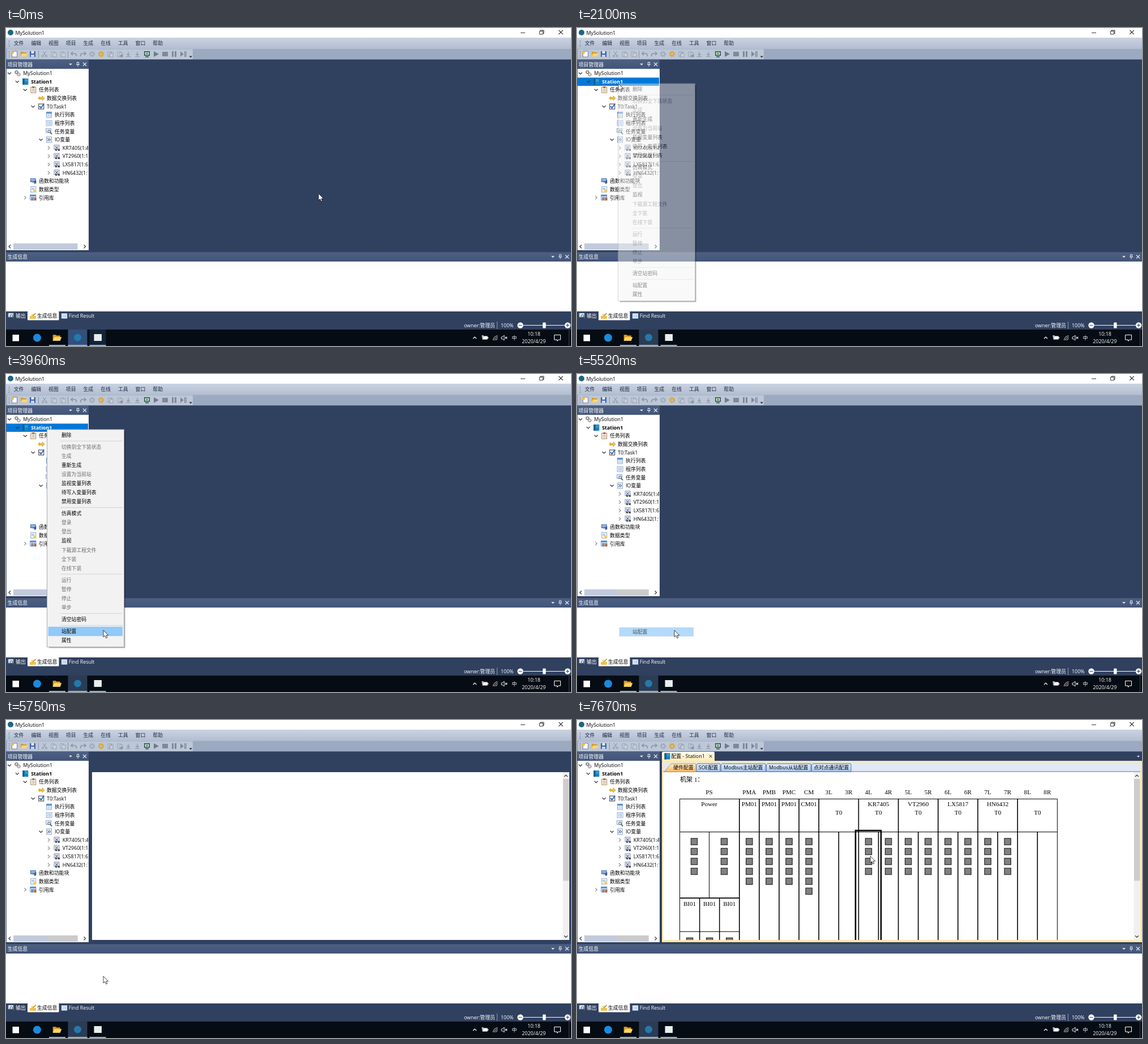
An HTML page for the animation above (8 s loop, 998x561 px).

```html
<!DOCTYPE html>
<html lang="zh-CN">
<head>
<meta charset="utf-8">
<title>MySolution1</title>
<style>
html, body { margin: 0; width: 100%; height: 100%; overflow: hidden; background: #30405f; }
svg { display: block; }
#stage { width: 100vw; height: 100vh; }
text { font: 8.9px 'Open Sans', 'Noto Sans CJK SC', 'Noto Sans CJK', sans-serif; white-space: pre; }
.serif text { font: 11.1px 'Liberation Serif', 'Noto Sans CJK SC', 'Noto Sans CJK', serif; }
.menu text { font-size: 8.8px; }
.bold { font-weight: 700; }
.mid { text-anchor: middle; }
.end { text-anchor: end; }
</style>
</head>
<body>
<svg id="stage" viewBox="0 0 998 561" preserveAspectRatio="none"></svg>
<script>
const LOOP = 8000;
const rect = (x, y, w, h, fill, extra = '') =>
  `<rect x="${x}" y="${y}" width="${w}" height="${h}" fill="${fill}" ${extra}/>`;
const text = (x, y, s, fill = '#000', cls = '', extra = '') =>
  `<text x="${x}" y="${y}" fill="${fill}" class="${cls}" ${extra}>${s}</text>`;
const line = (d, color, width = 1) =>
  `<path d="${d}" fill="none" stroke="${color}" stroke-width="${width}"/>`;
const shape = (d, fill, extra = '') => `<path d="${d}" fill="${fill}" ${extra}/>`;
const disc = (x, y, r, fill, extra = '') => `<circle cx="${x}" cy="${y}" r="${r}" fill="${fill}" ${extra}/>`;
const at = (x, y, body) => `<g transform="translate(${x} ${y})">${body}</g>`;
const group = (id, body, cls = '') => `<g id="${id}" class="${cls}">${body}</g>`;
const view = (x, y, w, h, body) =>
  `<svg x="${x}" y="${y}" width="${w}" height="${h}" viewBox="${x} ${y} ${w} ${h}">${body}</svg>`;
const gradient = (id, from, to) =>
  `<linearGradient id="${id}" x2="0" y2="1"><stop stop-color="${from}"/><stop offset="1" stop-color="${to}"/></linearGradient>`;
const cross = (x, y, r, color) =>
  line(`M${x - r} ${y - r}l${2 * r} ${2 * r}m0 ${-2 * r}l${-2 * r} ${2 * r}`, color, 1.1);
const chevron = (x, y, dir, color = '#333') =>
  at(x, y, `<g transform="rotate(${dir})">${line('M-3 -1.5L0 1.5L3 -1.5', color, 1.2)}</g>`);

// Icons are drawn around 0,0 in an 11 px box.
const page = (fill = '#fff', edge = '#7e93b3') => rect(-4.5, -5, 9, 10, fill, `stroke="${edge}" stroke-width=".8"`);
const gear = color => disc(0, 0, 3, 'none', `stroke="${color}" stroke-width="2"`) +
  disc(0, 0, 4.7, 'none', `stroke="${color}" stroke-width="1.4" stroke-dasharray="1.8 1.9"`);
const grid = page('#fff', '#7096c8') + rect(-5, -5, 10, 3, '#5b8fd0') +
  line('M-4 0H4M-4 2.5H4M-1.5 -2V5M1.8 -2V5', '#9bb8dc', .7);
const folder = shape('M-6 -4H-2L-1 -3H4V4H-6Z', '#d99b26') + shape('M-4 -1H6L4 4H-6Z', '#ffd766');
const icons = {
  solution: at(-2, -2, `<g transform="scale(.7)">${gear('#777')}</g>`) +
    at(2, 2, `<g transform="scale(.7)">${gear('#999')}</g>`),
  station: rect(-5, -5.5, 10, 11, '#1685bf') + rect(-5, -5.5, 3, 11, '#175a87') + line('M-1 -3H4M-1 -1H4', '#67bde5', .8),
  tasks: page('#fff7e6', '#9a6a35') + rect(-2, -6, 4, 2.5, '#8a5a2c') + line('M-2.5 -1.5H3M-2.5 .5H3M-2.5 2.5H3', '#999', .8),
  exchange: shape('M-6 0L-2 -4V-1.5H0V2H-2V4Z', '#e8b02c') + shape('M6 0L2 -4V-1.5H.5V2H2V4Z', '#f2cb55', 'stroke="#ba8416" stroke-width=".7"'),
  check: rect(-4.5, -4.5, 9, 9, '#fff', 'stroke="#555" stroke-width="1.2"') + line('M-3 -.5L-.5 2.5L5 -5', '#2468c8', 2),
  grid,
  program: rect(-5, -4.5, 10, 9, '#edf4fd', 'stroke="#7e9dc7" stroke-width=".8"') +
    line('M-3 -2H-1M0 -2H3M-3 0H-1M0 0H3M-3 2H-1M0 2H3', '#7aa0d4', .9),
  variable: rect(-5.5, -5, 9, 7, '#e4edf8', 'stroke="#7795bd" stroke-width=".8"') + disc(0, 0, 2.3, '#d4e8fb', 'stroke="#555"') +
    line('M2 2L5 5', '#555', 1.6),
  io: page('#eef2fb') + line('M-3 -2.5L-.5 0L-3 2.5M0 -2.5L2.5 0L0 2.5', '#4a68a8', 1.1),
  module: rect(-5, -5, 9, 8, '#e6e9f2', 'stroke="#76809a" stroke-width=".8"') +
    line('M-3 -3L2 2M2 -3L-3 2', '#5570a8', 1.1) + rect(-3, 2, 3, 3, '#444') + rect(1.5, 2, 3.5, 3, '#444'),
  block: rect(-5.5, -5, 10, 7, '#5c86c4') + line('M-4 -3H3M-4 -1H3', '#d7e5f7', .9) + shape('M5 -2V4L1 5L2 2L-2 3Z', '#34558c'),
  type: page('#f4f8ff') + line('M-3 -2H2M-3 0H1', '#6f9ad0', .9) + rect(0, 0, 5, 5, '#f0cf60'),
  library: rect(-5.5, -5, 10, 9, '#dce8f7', 'stroke="#4778b3" stroke-width=".8"') + rect(-5.5, -5, 10, 2.5, '#4f8ac9') +
    rect(-3.5, -1, 2.5, 6, '#4278b8') + rect(0, -1, 2.5, 6, '#d96b3b') + rect(3, 0, 2, 5, '#8a5030'),
  build: rect(-5.5, 0, 11, 5, '#efc14f') + rect(-3, -4, 4, 4, '#f7dc85') + line('M0 0L5 -5', '#b5822a', 1.6)
};
const icon = (name, x, y) => at(x, y, icons[name]);

const MODULES = ['KR7405', 'VT2960', 'LX5817', 'HN6432'];

function titleAndBars() {
  const names = ['文件', '编辑', '视图', '项目', '生成', '在线', '工具', '窗口', '帮助'];
  const gray = '#8a94a6';
  const blank = at(0, 0, rect(-4, -4, 6, 8, '#c9d0dc', `stroke="${gray}" stroke-width=".8"`) +
    rect(-1, -2, 6, 7, '#c9d0dc', `stroke="${gray}" stroke-width=".8"`));
  const down = line('M0 -4V2M-2.5 0L0 2.5L2.5 0M-4 4.5H4', gray, 1.2);
  const tools = [
    [15, page('#fff', '#667') + disc(-3.5, -3, 2.5, '#f2bd36')],
    [32, folder],
    [47, rect(-5, -5, 10, 10, '#3e62a8') + rect(-2.5, -5, 5, 4, '#e8eefa') + rect(-3, 1, 6, 4, '#c4d3ee')],
    [68, line('M-3 -5L2 2M3 -5L-2 2', gray) + disc(-3, 3.5, 1.6, 'none', `stroke="${gray}"`) + disc(3, 3.5, 1.6, 'none', `stroke="${gray}"`)],
    [84, blank], [100, blank],
    [120, line('M-2 -4L-5 -1L-2 2M-5 -1H2Q5 0 4 4', gray, 1.7)],
    [136, line('M2 -4L5 -1L2 2M5 -1H-2Q-5 0 -4 4', gray, 1.7)],
    [152, gear('#a2abba')], [168, gear('#e0a526')],
    [184, blank + line('M-3 4L4 -4', gray)], [201, blank + disc(3, 3, 2.5, gray)],
    [216, down], [232, down],
    [249, rect(-5, -5, 10, 8, '#30465a') + rect(-3.5, -3.5, 7, 5, '#cfeccb') + disc(0, -1, 1.8, '#3da34a') + rect(-3, 4, 6, 1.5, '#30465a')],
    [265, shape('M-4 -5L5 0L-4 5Z', '#6f7b8e')],
    [281, rect(-5, -4, 10, 8, '#7f899a')],
    [297, rect(-4, -5, 3, 10, '#7f899a') + rect(1, -5, 3, 10, '#7f899a')],
    [313, shape('M-5 -5L1 0L-5 5Z', '#7f899a') + rect(2, -5, 1.6, 10, '#7f899a') + rect(4.5, -5, 1.3, 10, '#7f899a')]
  ];
  return rect(0, 0, 998, 17, '#fff') + disc(8, 8, 5, '#1c6685') + text(16.5, 11.5, 'MySolution1') +
    line('M909 8.5H917M942.5 5.5H948.5V11H942.5ZM944 5.5V4H950V9.5H948.5', '#222', .9) + cross(980, 7.5, 3.7, '#222') +
    rect(0, 17, 998, 20, 'url(#bar)') + rect(0, 37, 998, 18.5, '#9caac1') +
    rect(2, 37.5, 328, 17.5, '#bcc7d8', 'rx="1.5"') +
    line('M5.5 22V33M5.5 41V52', '#6d7b92', '1.4" stroke-dasharray="1.4 1.8') +
    names.map((s, i) => text(13.7 + 30.7 * i, 30.2, s, '#1b293e')).join('') +
    tools.map(([x, body]) => at(x, 46, body)).join('') +
    line('M57.5 40V53M109.5 40V53', '#8592a8', .9) + shape('M323.5 49.5H329L326.2 52.5Z', '#333');
}

function header(y, w, title) {
  return rect(0, y, w, 16.5, 'url(#head)') + text(2.7, y + 11.7, title, '#fff') +
    shape(`M${w - 35} ${y + 6.7}h6l-3 3z`, '#e6ebf4') +
    line(`M${w - 21} ${y + 4.5}h4M${w - 20.5} ${y + 4.5}v4M${w - 17.5} ${y + 4.5}v4M${w - 22} ${y + 8.5}h6m-3 0v3.5`, '#e6ebf4') +
    cross(w - 7, y + 8, 3, '#e6ebf4');
}

function tree() {
  // level, label, icon, chevron rotation
  const rows = [
    [0, 'MySolution1', 'solution', 0], [1, 'Station1', 'station', 0], [2, '任务列表', 'tasks', 0],
    [3, '数据交换列表', 'exchange'], [3, 'T0:Task1', 'check', 0], [4, '执行列表', 'grid'],
    [4, '程序列表', 'program'], [4, '任务变量', 'variable'], [4, 'IO变量', 'io', 0],
    ...MODULES.map((name, i) => [5, `${name}(1:${'4:6:'[i] === ':' ? '1' : '46'[i / 2]}`, 'module', -90]),
    [2, '函数和功能块', 'block'], [2, '数据类型', 'type'], [2, '引用库', 'library', -90]
  ];
  const body = rows.map(([level, label, name, dir], i) => {
    const x = 13.9 * level, y = 80 + 14.62 * i, station = name === 'station';
    return (dir === undefined ? '' : chevron(x + 6, y, dir, dir ? '#888' : '#333')) + icon(name, x + 20.5, y) +
      text(x + 30.3, y + 3.2, label, '#000', station ? 'bold' : '', station ? 'id="station"' : '');
  }).join('');
  return rect(0, 72, 146, 320, '#fff') + rect(0, 72, .8, 320, '#30405f') +
    view(0, 72, 145, 307, rect(1, 87.5, 145, 14.5, '#0078d7', 'id="selected"') + body) +
    rect(13, 380, 113.5, 11, '#c2cbdc') + rect(72, 380, 54.5, 11, '#cbcbcb', 'id="thumb"') +
    chevron(6.5, 385.5, 90) + chevron(139, 385.5, -90);
}

function output() {
  return header(395.5, 998, '生成信息') + rect(0, 412, 998, 88, '#fff') +
    rect(38, 500, 55.5, 15.5, '#fff', 'rx="1"') +
    icon('variable', 9.5, 508) + text(17, 511, '输出', '#fff') +
    icon('build', 47.5, 508) + text(55, 511, '生成信息') +
    icon('program', 103, 508) + text(110.7, 511, 'Find Result', '#fff') +
    text(864, 528, 'owner:管理员', '#fff', 'end') + line('M867.5 518V531', '#8997b3') + text(874, 528, '100%', '#fff') +
    line('M914 524.5H987', '#fff') + rect(948, 519.5, 5.5, 10, '#fff', 'rx="1"') +
    [908.5, 992].map(x => disc(x, 524.5, 5.2, '#fff')).join('') +
    line('M905.5 524.5H911.5M989 524.5H995M992 521.5V527.5', '#33425f', 1.2);
}

function taskbar() {
  const lit = '#76b9ed';
  return rect(0, 532, 998, 29, '#060c13') + rect(109.5, 532, 34, 29, '#2b3c54', 'id="appButton"') +
    rect(147.5, 532, 29, 29, '#142338', 'id="hoverButton"') +
    rect(76, 559, 29, 2, lit) + rect(109.5, 559, 34, 2, lit) + rect(147.5, 559, 29, 2, lit) +
    rect(11.5, 541, 11.5, 11.5, '#fff') + disc(55, 546.5, 7, '#1b8ade') + at(90.5, 546.5, `<g transform="scale(1.3)">${folder}</g>`) +
    disc(126.5, 546, 6.5, '#2479ac') + rect(155.5, 540, 13.5, 12, '#e8eeee') +
    chevron(828, 546.5, 180, '#fff') +
    rect(841.5, 543.5, 9, 6, '#fff') + rect(850.5, 545, 1.4, 3, '#fff') + rect(840.5, 542, 3, 4, '#bbb') +
    line('M860.5 551A8 8 0 0 1 868.5 543M863 551A5.5 5.5 0 0 1 868.5 545.5M865.5 551A3 3 0 0 1 868.5 548', '#ddd') +
    shape('M875 545H877L880 542V551L877 548.5H875Z', 'none', 'stroke="#fff" stroke-width=".9"') + cross(883.5, 546.5, 1.7, '#fff') +
    text(898, 550, '中', '#fff', 'mid') + text(932.5, 543, '10:18', '#fff', 'mid') + text(932.3, 556.3, '2020/4/29', '#fff', 'mid') +
    shape('M968.5 541.5H979.5V550H975.5L973.5 552.5V550H968.5Z', 'none', 'stroke="#fff" stroke-width="1"') + line('M994.5 532V561', '#4b535d', .8);
}

function rack() {
  const unit = 35.1, left = 181.5, col = n => left + unit * n;
  const mid = (x, y, s) => text(x, y, s, '#000', 'mid');
  const leds = (x, count, top = 214.5) => Array.from({ length: count }, (_, i) =>
    rect(x - 5.7, top + 17.5 * i - 5.7, 11.4, 11.4, '#808080', 'stroke="#111" stroke-width="1"')).join('');
  let s = text(182, 109, '机架 1：') + mid(233.5, 131, 'PS') + mid(233.5, 152, 'Power') +
    leds(207, 4) + leds(260, 4);
  ['PMA', 'PMB', 'PMC', 'CM'].forEach((name, i) => {
    const x = col(3.5 + i);
    s += mid(x, 131, name) + mid(x, 152, i < 3 ? 'PM01' : 'CM01') + leds(x, i < 3 ? 5 : 6);
  });
  for (let i = 0; i < 6; i++) {
    const x = col(8 + 2 * i), module = MODULES[i - 1];
    s += mid(x - unit / 2, 131, `${i + 3}L`) + mid(x + unit / 2, 131, `${i + 3}R`) + mid(x, 166.5, 'T0');
    if (module) s += mid(x, 152, module) + leds(x - unit / 2, 4) + leds(x + unit / 2, 4);
    s += line(`M${x} 197V390`, '#000', 1.6);
  }
  for (const n of [3, 4, 5, 6, 7, 9, 11, 13, 15, 17]) s += line(`M${col(n)} 139V390`, '#000', 1.6);
  for (let i = 0; i < 3; i++) {
    s += mid(col(i + .5), 327.5, 'BI01') + leds(col(i + .5), 1, 390);
    if (i) s += line(`M${col(i)} 314V390`, '#000', 1.5);
  }
  s += line(`M${left} 390V139.3H${col(19)}V390M${left} 197.5H${col(19)}M233.5 197V314M${left} 373.3H286.5`, '#000') +
    line(`M${left} 314.2H287`, '#000', 1.8);
  return s + rect(492, 195, 45, 210, 'none', 'id="slot" stroke="#000" stroke-width="2.6"');
}

function editor() {
  const tabs = [['SOE配置', 211, 253], ['Modbus主站配置', 254.5, 333], ['Modbus从站配置', 334.5, 413], ['点对点通讯配置', 414.5, 484]];
  const chrome = rect(150, 56, 93, 20, 'url(#tab)', 'rx="2"') + rect(150, 72, 848, 320, '#ffe9a8') +
    icon('station', 159.5, 64) + text(166.3, 67.3, '配置 - Station1') + cross(236, 64, 2.3, '#6b5e3a') + shape('M989 63h5l-2.5 3z', '#dfe5ef') +
    rect(151.5, 75, 844, 17, '#dfe9f6') + line('M152 91H995', '#5f7fb0') +
    tabs.map(([s, a, b]) => shape(`M${a} 91V79L${a + 2} 77H${b - 1}L${b} 78V91Z`, 'url(#sub)', 'stroke="#40639e" stroke-width=".9"') +
      text((a + b) / 2, 87.3, s, '#000', 'mid')).join('') +
    shape('M154 91.5L165 78.5L168 77H209L210 78V91.5Z', 'url(#active)', 'stroke="#b5832e" stroke-width=".8"') + text(170.3, 87.3, '硬件配置');
  return group('chrome', chrome) + rect(152, 92, 843, 296, '#fff') + rect(983.5, 92, 11.5, 296, '#f0f0f0') +
    rect(984, 104, 10.5, 179.5, '#cdcdcd') + chevron(989, 98.5, 180) + chevron(989, 382, 0) +
    view(152, 92, 831, 296, group('rack', rack(), 'serif'));
}

// '~' marks a disabled entry, '-' a separator.
const MENU = ('删除 - ~切换到全下装状态 ~生成 重新生成 ~设置为当前站 监视变量列表 待写入变量列表 禁用变量列表 - ' +
  '仿真模式 ~登录 ~登出 监视 ~下载源工程文件 ~全下装 ~在线下装 - ~运行 ~暂停 ~停止 ~单步 - 清空站密码 - 站配置 属性').split(' ');
const entries = [];
function contextMenu() {
  let y = 99.5, body = '';
  for (const item of MENU) {
    if (item === '-') {
      body += rect(96, y + 2.2, 110, .9, '#cfcfcf');
      y += 5.1;
      continue;
    }
    const off = item[0] === '~';
    entries.push({ y, off });
    body += text(98, y + 11.2, item.replace('~', ''), off ? '#6d6d6d' : '#000');
    y += 16.05;
  }
  const ghost = rect(74.5, 447, 131.5, 16, '#91c9f7') + text(98, 457.8, '站配置');
  return group('shadow', rect(208.5, 101, 2, 382.5, '#000', 'opacity=".3"') + rect(76, 481.5, 132.5, 2, '#000', 'opacity=".3"')) +
    group('menu', rect(72.5, 98, 136, 383.5, '#f2f2f2', 'stroke="#a5a5a5" stroke-width=".9"') +
      rect(74.5, 0, 131.5, 16.5, '#91c9f7', 'id="hover"') + body, 'menu') +
    group('ghost', ghost, 'menu');
}

const stage = document.getElementById('stage');
stage.innerHTML = '<defs>' + gradient('bar', '#cad3e2', '#b2bdd0') + gradient('head', '#4d6082', '#42557a') +
  gradient('tab', '#fffcf2', '#ffe9a8') + gradient('sub', '#e2eefc', '#a9c8f0') + gradient('active', '#fff0d0', '#ffb75a') + '</defs>' +
  rect(0, 0, 998, 561, '#30405f') + titleAndBars() + header(56, 146, '项目管理器') + tree() + output() + taskbar() +
  group('editor', editor()) + contextMenu() +
  group('cursor', shape('M0 0V12L2.8 9.6L4.8 14L6.8 13.1L4.9 9H8.7Z', '#fff', 'stroke="#111" stroke-width=".8" stroke-linejoin="round"'));

const el = Object.fromEntries([...stage.querySelectorAll('[id]')].map(node => [node.id, node]));
const show = (node, on) => node.setAttribute('display', on ? 'inline' : 'none');

// first change, last change, steps, control point, end point
const START = [552, 292];
const MOVES = [
  [300, 610, 5, [575, 328], [603, 289]],
  [850, 1630, 11, [338, 185], [73, 95]],
  [1860, 1860, 1, [73, 97], [73, 98]],
  [2950, 2950, 1, [78, 108], [83, 117]],
  [3028, 3730, 10, [130, 280], [172, 438]],
  [3800, 3960, 3, [172, 445], [172, 452]],
  [6290, 7060, 11, [400, 78], [514, 242]],
  [7130, 7210, 2, [517, 242], [519, 242]],
  [7520, 7520, 1, [518, 241], [518, 240]]
];

function pointer(t) {
  let from = START;
  for (const [first, last, steps, via, to] of MOVES) {
    if (t < first) break;
    const gap = (last - first) / (steps - 1) || 1;
    const u = Math.min(steps, Math.floor((t - first) / gap + 1e-6) + 1) / steps;
    const e = u * u * (3 - 2 * u);
    from = from.map((p, i) => p * (1 - e) ** 2 + 2 * e * (1 - e) * via[i] + to[i] * e * e);
  }
  return from;
}

// Value of the last [time, value] pair reached.
const held = (t, pairs) => pairs.reduce((value, [time, next]) => t >= time ? next : value, 0);

function draw(t) {
  const [x, y] = pointer(t);
  el.cursor.setAttribute('transform', `translate(${x.toFixed(1)} ${y.toFixed(1)})`);
  el.appButton.setAttribute('fill', t < 70 ? '#33507a' : '#2b3c54');
  show(el.hoverButton, t < 70);

  const open = t >= 2100 && t < 5520;
  show(el.selected, open);
  el.station.setAttribute('fill', open ? '#fff' : '#000');
  show(el.thumb, t >= 5520);
  show(el.shadow, open);
  el.menu.setAttribute('opacity', held(t, [[2100, .45], [2180, .85], [2260, 1], [5520, 0]]));
  el.ghost.setAttribute('opacity', held(t, [[5520, .68], [5590, .38], [5670, .12], [5750, 0]]));
  const over = entries.find(e => y - 3 >= e.y - .5 && y - 3 < e.y + 16);
  show(el.hover, open && over);
  if (over) {
    el.hover.setAttribute('y', over.y - .2);
    el.hover.setAttribute('fill', over.off ? '#e6e6e6' : '#91c9f7');
  }

  show(el.editor, t >= 5750);
  show(el.chrome, t >= 5820);
  show(el.rack, t >= 5820);
  show(el.slot, t >= 7670);
}

const begin = performance.now();
function tick() {
  draw((performance.now() - begin) % LOOP);
  requestAnimationFrame(tick);
}
tick();
</script>
</body>
</html>
```
